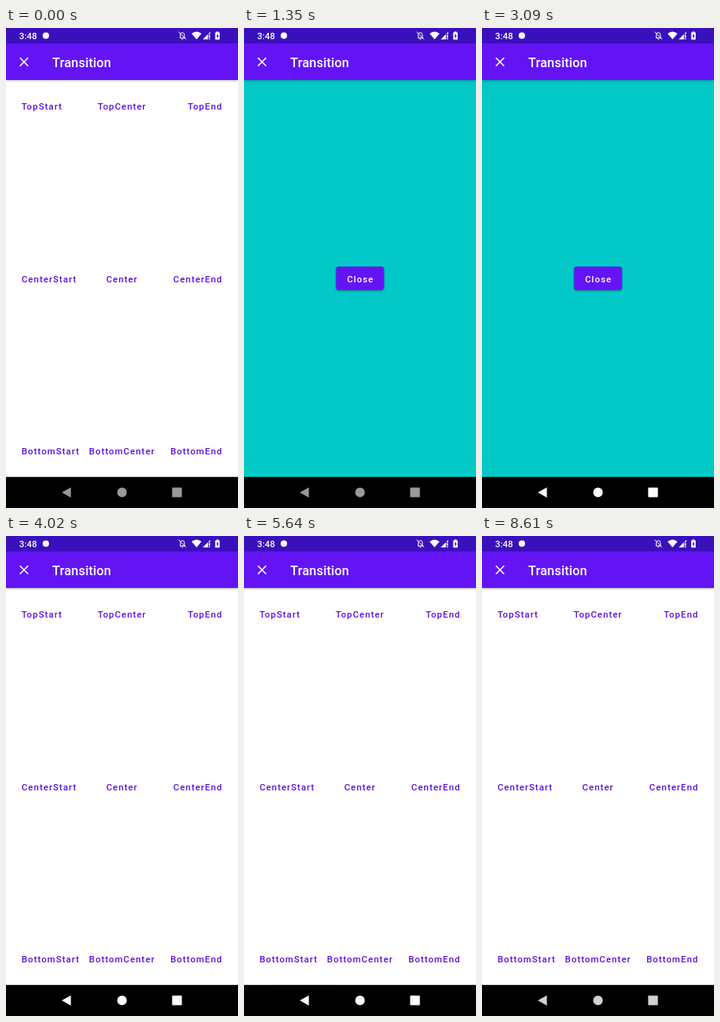
Animation of 291x600 px, one loop 8670 ms. Source, as an HTML page:

```html
<!DOCTYPE html>
<html>
<head>
<meta charset="utf-8">
<style>
html, body { margin: 0; height: 100%; overflow: hidden; background: #fff; }
svg { display: block; width: 291px; height: 600px; }
text { font: 500 11.32px Roboto, sans-serif; }
.label { fill: #5b10dc; letter-spacing: 1.01px; }
.white { fill: #fff; }
#bar { filter: drop-shadow(0 1px 1.5px rgba(0,0,0,.28)); }
#close { filter: drop-shadow(0 1px 1.2px rgba(0,0,0,.4)); }
</style>
</head>
<body>
<svg viewBox="0 0 291 600">
  <defs>
    <clipPath id="reveal"><circle id="hole"/></clipPath>
    <clipPath id="touch"><rect id="bounds" height="29" rx="3.2"/></clipPath>
    <clipPath id="closeShape"><rect x="115.5" y="298.3" width="60" height="29.2" rx="3.2"/></clipPath>
  </defs>
  <rect width="291" height="600" fill="#fff"/>
  <g id="labels"></g>
  <circle id="ink" fill="#6200ee" clip-path="url(#touch)"/>

  <g clip-path="url(#reveal)">
    <rect y="64" width="291" height="498" fill="#02c8c8"/>
    <rect id="close" x="115.5" y="298.3" width="60" height="29.2" rx="3.2" fill="#6414f4"/>
    <circle id="closeInk" cx="145.5" cy="313" fill="#fff" clip-path="url(#closeShape)"/>
    <text class="label" x="146" y="317.5" text-anchor="middle" style="fill:#fff">Close</text>
  </g>

  <rect id="bar" y="19" width="291" height="46" fill="#6414f4"/>
  <rect width="291" height="19.4" fill="#3a10bc"/>
  <path d="M17.5 37.3l10.2 10.2m0-10.2l-10.2 10.2" stroke="#fff" stroke-width="1.6"/>
  <text class="white" x="58" y="48.6" style="font-size:16.17px;letter-spacing:.12px">Transition</text>

  <text class="white" x="16.6" y="13.6">3:48</text>
  <circle class="white" cx="50" cy="9.6" r="4"/>
  <g fill="none" stroke="#fff">
    <path d="M218 12.4h7M218.6 12V8.6a2.6 2.9 0 0 1 5.2 0V12M216.4 4.6l9.4 9.6"/>
    <path d="M220.2 14h2"/>
  </g>
  <path class="white" d="M232.8 7Q239 2 245.2 7L239 14.2Z"/>
  <path class="white" d="M246.8 14.2L256.2 4.8V7.4H253.4V14.2ZM254.5 8.6h1.5v3.4h-1.5ZM254.5 12.8h1.5v1.4h-1.5Z"/>
  <path class="white" d="M263.8 4.4h2.8v1h1.4v9h-5.6v-9h1.4Z"/>
  <path d="M265.8 6.8l-2.1 3.6h1.3v2.6l2-3.6h-1.2Z" fill="#3a10bc"/>

  <rect y="561.2" width="291" height="39" fill="#000"/>
  <rect id="glow" y="561.2" height="38.8" rx="19.4" fill="#fff"/>
  <g id="nav">
    <path d="M81.4 574.2v12.8L70 580.6Z"/>
    <circle cx="145.5" cy="580.5" r="6"/>
    <rect x="208.4" y="574.4" width="12.2" height="12.2" rx=".8"/>
  </g>
</svg>
<script>
const $ = id => document.getElementById(id);
const set = (el, attrs) => { for (const k in attrs) el.setAttribute(k, attrs[k]); };
const clamp = x => Math.min(1, Math.max(0, x));
const LOOP = 8670, LEFT = 19.4, RIGHT = 271.6, MID = 145.5;

['Top', 'Center', 'Bottom'].forEach((row, r) => ['Start', 'Center', 'End'].forEach((col, c) => {
  const el = document.createElementNS('http://www.w3.org/2000/svg', 'text');
  el.textContent = row === col ? row : row + col;
  set(el, { class: 'label', x: [LEFT, MID, RIGHT][c], y: 102 + r * 215.7,
            'text-anchor': ['start', 'middle', 'end'][c] });
  $('labels').append(el);
}));

// tap: finger down; back / button: how the panel is dismissed; box: tapped label
const runs = [
  { x: 291, y: 65, max: 576, tap: 420, open: 540, close: 1605, back: 1470, box: [221, 57, 98] },
  { x: MID, y: 313, max: 288, tap: 2490, open: 2610, close: 3490, button: 3360, box: [119.6, 52, 313.7] },
  { x: 0, y: 561, max: 576, tap: 4080, open: 4200, close: 5195, back: 5055, box: [13, 86, 529.4] }
];

// Critically damped spring: share of the way still left
function left(ms) {
  if (ms <= 0) return 1;
  const w = ms * .02, s = (1 + w) * Math.exp(-w);
  return s < .01 ? 0 : s;
}

// Touch ripple inside a button
function press(el, ms, size, alpha) {
  const fade = clamp(ms / 75) * (1 - clamp((ms - 225) / 150));
  set(el, { r: size * (.3 + .7 * clamp(ms / 225)), opacity: alpha * fade });
}

function navLevel(t) {
  if (t < 1720) return .6 + .4 * clamp((t - 1470) / 250);
  return 1 - .18 * clamp((t - 8250) / 360);
}

function draw(t) {
  const run = runs.findLast(r => t >= r.tap) || runs[0];
  const shown = t < run.close ? 1 - left(t - run.open) : left(t - run.close);
  set($('hole'), { cx: run.x, cy: run.y, r: run.max * shown });

  const [x, width, y] = run.box;
  set($('bounds'), { x, width, y: y - 14.5 });
  set($('ink'), { cx: x + width / 2, cy: y });
  press($('ink'), t - run.tap, width * .56, .12);
  press($('closeInk'), run.button ? t - run.button : -1, 34, .24);

  const down = run.back ? t - run.back : -1;
  const grow = 1 - Math.pow(1 - clamp(down / 350), 4);
  const fade = clamp(down / 60) * (1 - clamp((down - 145) / 450));
  set($('glow'), { x: 76.4 - 43.6 * grow, width: 87.2 * grow, opacity: .2 * fade });

  const v = Math.round(255 * navLevel(t));
  set($('nav'), { fill: `rgb(${v},${v},${v})` });
}

const start = performance.now();
function tick() {
  draw((performance.now() - start) % LOOP);
  requestAnimationFrame(tick);
}
tick();
</script>
</body>
</html>
```
